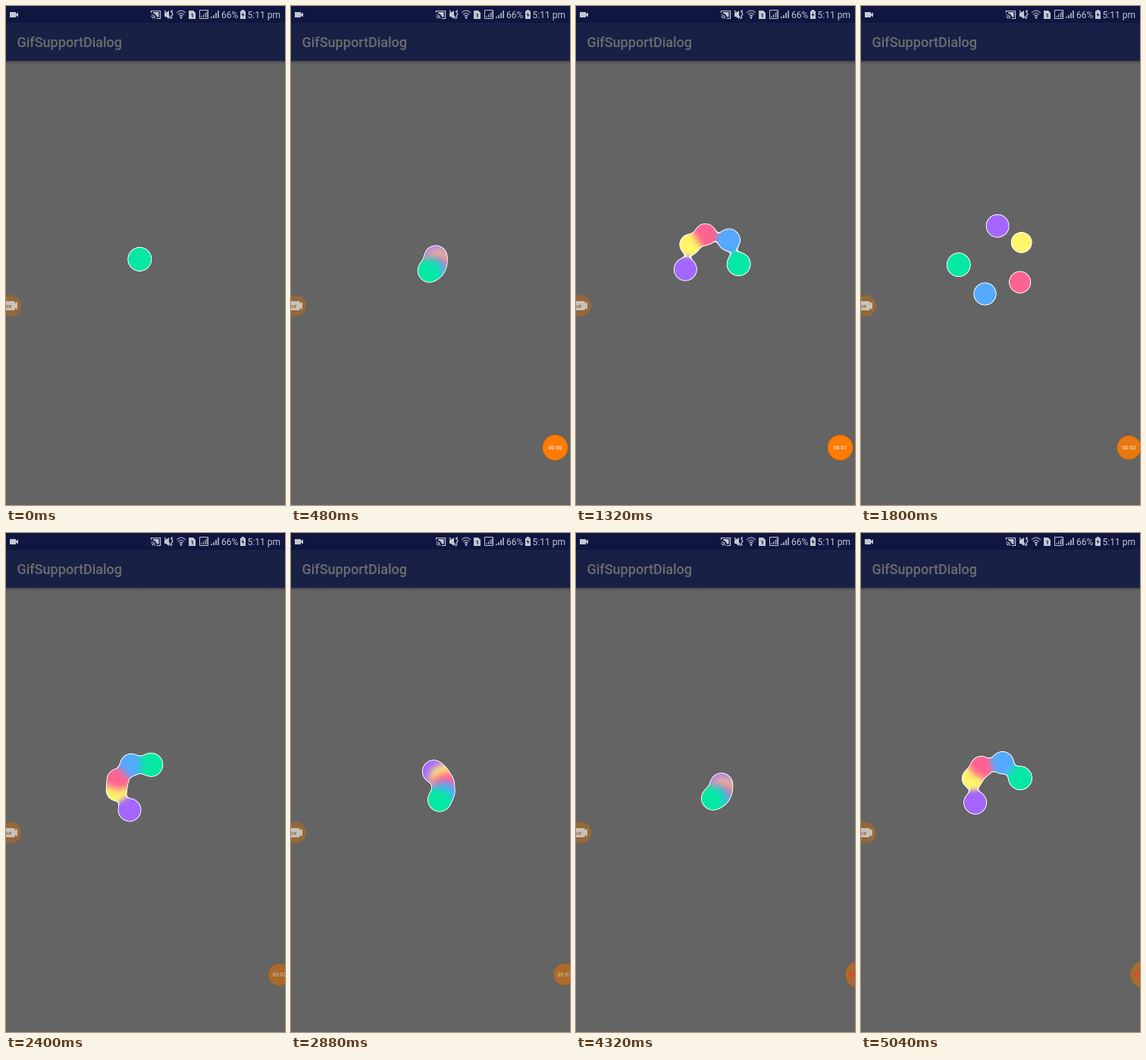
Animation of 368 by 656 pixels, one loop 5160 ms. Source, as an HTML page:

```html
<!DOCTYPE html>
<html lang="en">
<head>
<meta charset="utf-8">
<title>Gooey loader dialog</title>
<style>
  html, body { margin: 0; width: 100%; height: 100%; overflow: hidden; background: #646464; }
  svg { display: block; width: 368px; height: 656px; font-family: Roboto, sans-serif; }
</style>
</head>
<body>
<svg viewBox="0 0 368 656">
  <defs>
    <linearGradient id="shade" x2="0" y2="1">
      <stop stop-color="#444549"/><stop offset="1" stop-color="#646464"/>
    </linearGradient>
    <filter id="goo" filterUnits="userSpaceOnUse" x="90" y="250" width="180" height="180" color-interpolation-filters="sRGB">
      <feGaussianBlur in="SourceGraphic" stdDeviation="5" result="blur"/>
      <feColorMatrix in="blur" values="0 0 0 0 1  0 0 0 0 1  0 0 0 0 1  0 0 0 20 -6.6" result="rim"/>
      <feColorMatrix in="blur" values="1 0 0 0 0  0 1 0 0 0  0 0 1 0 0  0 0 0 20 -8.1" result="body"/>
      <feMerge><feMergeNode in="rim"/><feMergeNode in="body"/></feMerge>
    </filter>
  </defs>

  <rect width="368" height="656" fill="#646464"/>
  <rect y="72" width="368" height="4" fill="url(#shade)"/>
  <rect y="22" width="368" height="50" fill="#182046"/>
  <rect width="368" height="22" fill="#0f1640"/>
  <text x="14.5" y="53.5" font-size="18" font-weight="500" fill="#6b6e6c">GifSupportDialog</text>

  <g fill="#c3c7d3">
    <path d="M5 8h8v2.5l3-2v6l-3-2V15H5z"/>
    <g fill="none" stroke="#c3c7d3" stroke-width="1.2">
      <path d="M191.5 9V6.500h12v10h-5M191.500 11.500a5 5 0 0 1 5 5M191.500 14a2.500 2.500 0 0 1 2.500 2.500"/>
      <path d="M209 6l9 11M217 8l2-2v3l1 2-2 2 1 3"/>
      <path d="M225 9q6-6 12 0M227 11.500q4-4 8 0" stroke="#8b90a8"/>
      <path d="M229 13.500q2-2 4 0"/>
      <path d="M255.500 5.500h11v11h-11zM258 15v-2M260.500 15v-4M263 15V9M265 15V7" stroke-width="1"/>
      <path d="M271 16v-2M274 16v-4M277 16v-7M280 16V6" stroke-width="1.5"/>
    </g>
    <path d="M194 8h7.500v6.500H199q-1-4-5-5zM209 9h2l4-3v11l-4-3h-2z"/>
    <circle cx="231" cy="15.500" r="1.300"/>
    <path d="M241 6h6l3 3v8h-9zM311 5h3v1.500h2V17h-7V6.500h2z"/>
    <text x="243.500" y="15" font-size="8" font-weight="700" fill="#0f1640">1</text>
    <path d="M313 8l-2.500 4h2l-.5 3 2.500-4h-2z" fill="#0f1640"/>
    <text x="284" y="16" font-size="12">66%</text>
    <text x="362" y="16" font-size="12" text-anchor="end">5:11 pm</text>
  </g>

  <g>
    <circle cx="6" cy="394" r="14" fill="#94683b"/>
    <path d="M-2 388H10q2 0 2 2v1l3-2v10l-3-2v1q0 2-2 2H-2z" fill="#c9c2b9"/>
    <text x="0" y="396.500" font-size="5" font-weight="700" fill="#94683b">GIF</text>
  </g>

  <g id="balls" filter="url(#goo)"></g>

  <g id="timer">
    <circle cy="580.500" id="halo" fill="#7b6045"/>
    <circle cy="580.500" id="disc"/>
    <text y="583" id="clock" font-size="7" font-weight="500" text-anchor="middle"></text>
    <rect y="577" width="8" height="7" rx="1" id="stop" fill="#d05328"/>
  </g>
</svg>

<script>
const LOOP = 5160, STEP = 120, CENTER = [178.5, 335];
const get = id => document.getElementById(id);
const set = (el, attrs) => { for (const k in attrs) el.setAttribute(k, attrs[k]); };

// Back to front; `lean` shifts the orbit radius when the ring is uneven.
const balls = [
  { color: '#a566ff', size: 14.4, lean: 0 },
  { color: '#fff56b', size: 13, lean: -5 },
  { color: '#ff6391', size: 13.6, lean: -4 },
  { color: '#55aaff', size: 14.1, lean: 0 },
  { color: '#05e8a4', size: 14.9, lean: 4 }
];
for (const ball of balls) {
  ball.el = document.createElementNS('http://www.w3.org/2000/svg', 'circle');
  set(ball.el, { r: ball.size, fill: ball.color });
  get('balls').append(ball.el);
}

// time, orbit radius, unevenness, then one angle per ball
const poses = [
  [0, 3, 0, -135, -135, -135, -135, -135],
  [500, 14, 0, -18, 0, 25, 50, 80],
  [840, 25, .4, 62, 122, 129, 160, 198],
  [1240, 34, 0, 145, 201, 234, 284, 338],
  [1800, 46, 1, 272, 324, 402, 469, 534],
  [2400, 33, 0, 478, 534, 559, 606, 653],
  [2680, 44, 0, 510, 560, 612, 665, 715],
  [3000, 12, 0, 735, 745, 755, 770, 790],
  [3360, 9, 0, 820, 820, 820, 820, 869],
  [3840, 5, 0, 935, 945, 955, 970, 1000],
  [4320, 14, 0, 1062, 1080, 1105, 1130, 1160],
  [5040, 34, 0, 1225, 1281, 1314, 1364, 1418]
];

function slope(i, k) {
  const a = poses[Math.max(i - 1, 0)], b = poses[Math.min(i + 1, poses.length - 1)];
  return (b[k] - a[k]) / (b[0] - a[0]);
}

// Cubic Hermite between neighbouring poses
function poseAt(t) {
  let i = 0;
  while (i < poses.length - 2 && t >= poses[i + 1][0]) i++;
  const a = poses[i], b = poses[i + 1], span = b[0] - a[0], u = (t - a[0]) / span;
  const ease = u * u * (3 - 2 * u);
  return a.map((v, k) => v + (b[k] - v) * ease
    + span * u * (1 - u) * ((1 - u) * slope(i, k) - u * slope(i + 1, k)));
}

const timerStates = [
  { from: 360, x: 348.5, r: 16.5, color: '#ff7b04', ink: '#ffe9d2' },
  { from: 1800, x: 353.5, r: 15.5, color: '#e9770f', ink: '#f8dcc0' },
  { from: 1920, x: 360.5, r: 14, color: '#ab6a2c', ink: '#cfb79e' },
  { from: 4320, x: 373, r: 17.5, color: '#a96b34', ink: 'none' }
];

function drawTimer(t) {
  const state = timerStates.filter(s => t >= s.from).pop();
  set(get('timer'), { visibility: state ? 'visible' : 'hidden' });
  if (!state) return;
  const { x, r, color, ink } = state;
  const seconds = [1080, 1680, 2640, 3480].filter(s => t >= s).length;
  set(get('halo'), { cx: x, r: r + 1.3 });
  set(get('disc'), { cx: x, r, fill: color });
  set(get('clock'), { x, fill: ink });
  get('clock').textContent = '00:0' + seconds;
  set(get('stop'), { x: 360, opacity: ink === 'none' ? 1 : 0 });
}

function draw(now) {
  const t = Math.floor(now % LOOP / STEP) * STEP;
  const [, radius, uneven, ...angles] = poseAt(t);
  balls.forEach((ball, i) => {
    const a = angles[i] * Math.PI / 180, r = radius + uneven * ball.lean;
    set(ball.el, { cx: CENTER[0] + r * Math.cos(a), cy: CENTER[1] + r * Math.sin(a) });
  });
  drawTimer(t);
}

const start = performance.now();
function tick() {
  draw(performance.now() - start);
  requestAnimationFrame(tick);
}
tick();
</script>
</body>
</html>
```
